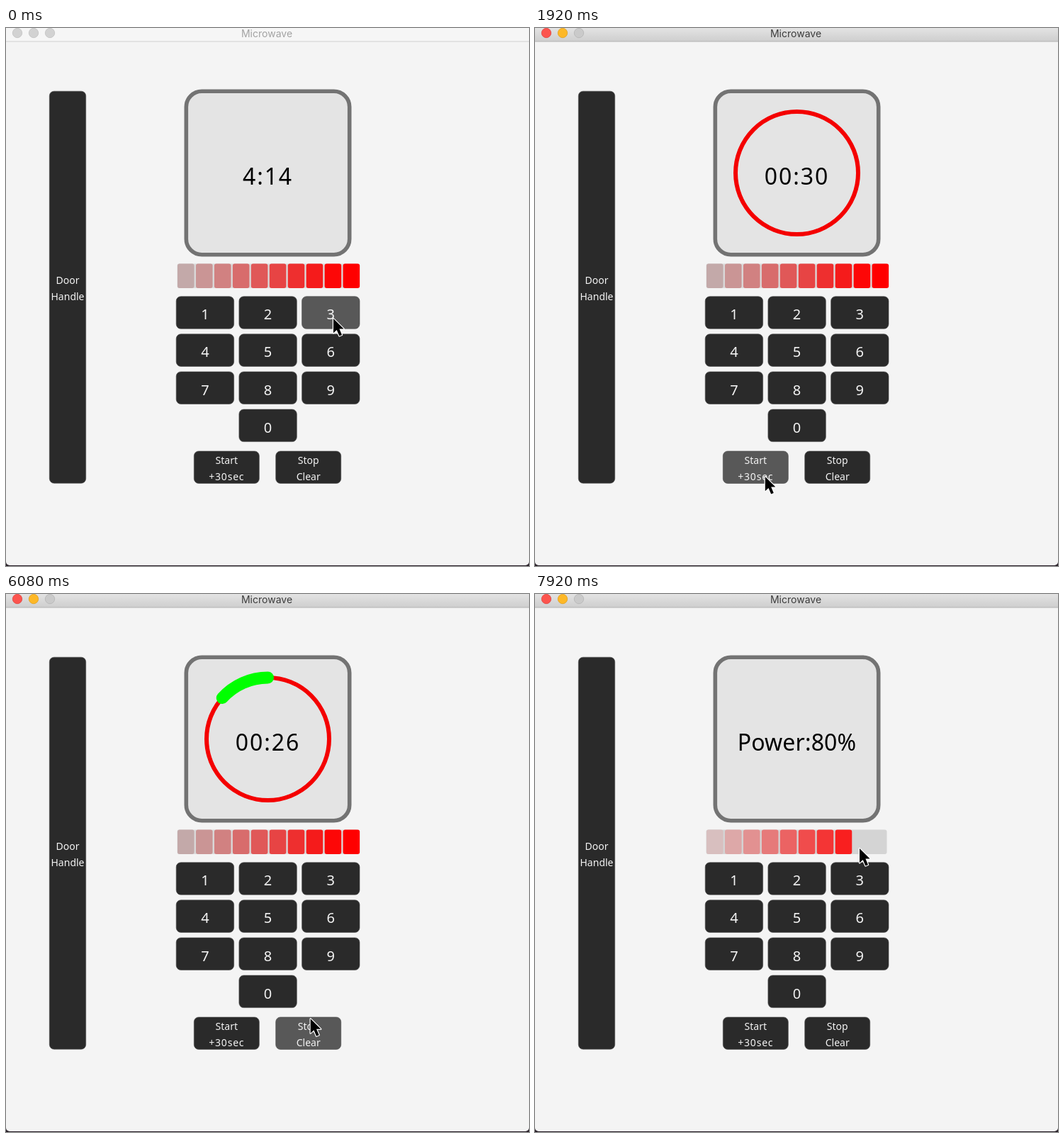
Recreate the animation shown at these times as an HTML page. Size 738 px wide and 759 px high, loop 8 s.

```html
<!DOCTYPE html>
<html lang="en">
<head>
<meta charset="utf-8">
<title>Microwave</title>
<style>
  html, body { margin: 0; width: 100%; height: 100%; overflow: hidden; background: #f4f4f4; }
  svg { display: block; width: 738px; height: 759px; }
  text { font-family: "Noto Sans", "Open Sans", sans-serif; text-anchor: middle; }
  #title { font: 14px Inter, Roboto, sans-serif; fill: #3c3c3c; }
  .idle #title { fill: #a3a3a3; }
  .idle #bar { fill: #f6f6f6; }
  .idle #rule { fill: #d2d2d2; }
  .idle .light { fill: #d2d2d2; stroke: #c2c2c2; }
  .key rect { fill: #2a2a2a; stroke: #484848; stroke-width: .6; }
  .key.hot rect { fill: #585858; }
  .key text { fill: #f4f4f4; font-size: 14px; }
  .key .digit { font-size: 20px; }
  .key .spaced { letter-spacing: .8px; }
  #readout { font-size: 32px; letter-spacing: 1.9px; }
  #readout.word { letter-spacing: .15px; }
</style>
</head>
<body>
<svg id="stage" viewBox="0 0 738 759">
  <defs>
    <linearGradient id="metal" x2="0" y2="1">
      <stop stop-color="#e3e3e3"/><stop offset="1" stop-color="#cecece"/>
    </linearGradient>
  </defs>
  <rect width="738" height="759" fill="#292029"/>
  <rect y="-10" width="738" height="768" rx="5" fill="#f4f4f4"/>
  <rect id="bar" width="738" height="19" fill="url(#metal)"/>
  <rect id="rule" y="18.5" width="738" height="1" fill="#b3b3b3"/>
  <g stroke-width=".8">
    <circle class="light" cx="16" cy="7" r="6.7" fill="#fc544e" stroke="#df4640"/>
    <circle class="light" cx="39" cy="7" r="6.7" fill="#fdb827" stroke="#dfa023"/>
    <circle class="light" cx="62" cy="7" r="6.7" fill="#cacaca" stroke="#b5b5b5"/>
  </g>
  <text id="title" x="368" y="12.5">Microwave</text>

  <rect x="254.3" y="89.3" width="230.4" height="230.4" rx="22" fill="#e4e4e4" stroke="#737373" stroke-width="5.6"/>
  <g id="dial" fill="none">
    <circle cx="369.5" cy="204.5" r="86.5" stroke="#f40000" stroke-width="6"/>
    <path id="arc" stroke="#0f0" stroke-width="17" stroke-linecap="round"/>
  </g>
  <text id="readout" x="369.5" y="220.5"></text>
  <g id="power"><rect id="track" x="241.5" y="332.5" width="255" height="34.5" rx="3"/></g>
  <g id="keys"></g>
  <path id="cursor" d="M0 0V20.3L4.7 15.9L8.4 24.4L12 22.9L8.4 14.5H14.6Z"
        stroke="#fff" stroke-width="2.4" paint-order="stroke" stroke-linejoin="round"/>
</svg>
<script>
const LOOP = 8000, STEP = 80, LAG = 120;
const $ = id => document.getElementById(id);

function add(parent, tag, attrs, text = "") {
  const el = document.createElementNS("http://www.w3.org/2000/svg", tag);
  for (const name in attrs) el.setAttribute(name, attrs[name]);
  el.textContent = text;
  return parent.appendChild(el);
}

// Keys: a box with a single digit or lines of text
const keys = [];
function addKey(x, y, w, h, lines, base) {
  const g = add($("keys"), "g", { class: "key" });
  add(g, "rect", { x, y, width: w, height: h, rx: 6.5 });
  lines.forEach((line, i) => {
    const style = line.length === 1 ? "digit" : line[0] === "+" ? "spaced" : "";
    add(g, "text", { x: x + w / 2, y: base + i * 23, class: style }, line);
  });
  const key = { g, x, y, w, h };
  keys.push(key);
  return key;
}
for (let n = 1; n <= 10; n++) {
  const col = n === 10 ? 1 : (n - 1) % 3, row = Math.floor((n - 1) / 3);
  const y = 378.7 + row * 53.1;
  addKey(240.2 + col * 88.7, y, 81.4, 45.6, [String(n % 10)], y + 32.6);
}
addKey(265.3, 597, 92, 45.4, ["Start", "+30sec"], 615);
addKey(380.7, 597, 92, 45.4, ["Stop", "Clear"], 615);
const handle = addKey(61.3, 89.2, 51.4, 553, ["Door", "Handle"], 361);

const cells = Array.from({ length: 10 }, (_, i) =>
  add($("power"), "rect", { x: 242 + i * 25.95, y: 332.5, width: 23.6, height: 34.5, rx: 3 }));

// Pointer stops: time, x, y
const path = [
  [0, 461, 409], [160, 461, 409], [480, 412, 606], [560, 402, 608], [640, 391, 587],
  [880, 372, 592], [960, 360, 600], [1360, 323, 632], [2080, 324, 632], [5040, 330, 633],
  [5200, 400, 634], [5520, 440, 632], [5680, 447, 630], [6160, 425, 592], [6640, 365, 590],
  [6800, 345, 595], [6880, 352, 575], [7040, 400, 485], [7280, 455, 390], [7440, 468, 368],
  [7760, 457, 358], [8000, 457, 358]
];
function pointer(t) {
  const i = Math.max(1, path.findIndex(p => p[0] >= t));
  const [t0, x0, y0] = path[i - 1], [t1, x1, y1] = path[i];
  const k = Math.max(0, (t - t0) / (t1 - t0));
  return [x0 + (x1 - x0) * k, y0 + (y1 - y0) * k];
}

function powerAt(t) {
  return t < 7440 ? 100 : t < 7600 ? 90 : 80;
}
function secondsAt(t) {
  return t < 2320 ? 30 : 29 - Math.floor((t - 2320) / 960);
}

function draw(now) {
  const t = Math.floor(now % LOOP / STEP) * STEP;
  const setting = t >= 7280, running = t >= 1600 && !setting;
  const left = secondsAt(t), power = powerAt(t);

  $("stage").classList.toggle("idle", t < 80);
  $("readout").classList.toggle("word", setting);
  $("readout").textContent =
    setting ? `Power:${power}%` :
    running ? `00:${left}` :
    t < 80 ? "4:14" : t < 720 ? "00:03" : "00:00";

  $("dial").style.display = running ? "" : "none";
  const a = (30 - left) * Math.PI / 15;
  $("arc").setAttribute("d", a
    ? `M369.5 118A86.5 86.5 0 0 0 ${369.5 - 86.5 * Math.sin(a)} ${204.5 - 86.5 * Math.cos(a)}` : "");

  const base = setting ? 212 : 188;
  $("track").setAttribute("fill", setting ? "#d4d4d4" : "#dadada");
  cells.forEach((cell, i) => {
    const k = Math.min(1, .1 + .108 * i), g = base * (1 - k);
    cell.setAttribute("fill", `rgb(${g + 255 * k},${g},${g})`);
    cell.style.display = i < power / 10 ? "" : "none";
  });

  // The screen answers slightly later than the pointer moves
  const [hx, hy] = pointer(Math.max(0, t - LAG));
  for (const { g, x, y, w, h } of keys)
    g.classList.toggle("hot", hx >= x && hx <= x + w && hy >= y && hy <= y + h);

  $("cursor").setAttribute("transform", `translate(${pointer(t).map(v => v + 1)})`);
}

const start = performance.now();
function tick() {
  draw(performance.now() - start);
  requestAnimationFrame(tick);
}
tick();
</script>
</body>
</html>
```
